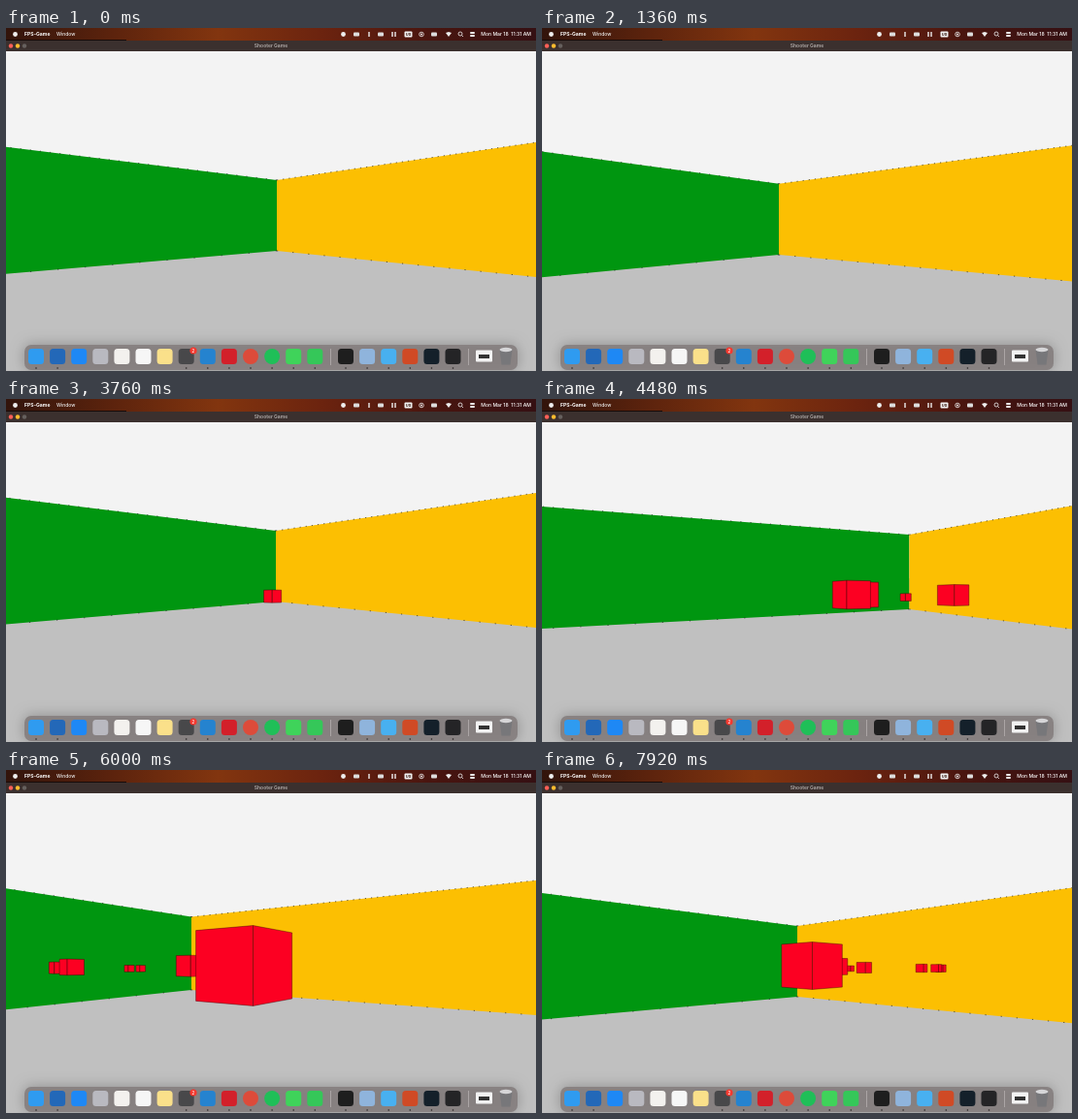
An HTML page with a canvas that plays this animation: 546x354 px, repeating every 8 s.

```html
<!DOCTYPE html>
<html lang="en">
<head>
<meta charset="utf-8">
<title>Shooter Game</title>
<style>
html, body { margin: 0; width: 100%; height: 100%; overflow: hidden; background: #c0c0c0; }
canvas { display: block; }
</style>
</head>
<body>
<canvas id="stage" width="546" height="354"></canvas>
<script>
const c = document.getElementById('stage').getContext('2d');
const W = 546, H = 354, MID = 273, FOCAL = 322, LOOP = 8000, STEP = 80;
const WALL = 73;              // wall height on screen when facing the corner
const EYE = 0.59;             // part of the wall above the horizon
const SPEED = 0.027;          // cube edges per ms
const LIFE = 2500;

// The player's view: time, x of the room corner, y of the horizon
const PATH = [
  [0, 279, 200], [1360, 244, 204], [2720, 345.5, 178], [2840, 275, 178],
  [3760, 278, 179], [3850, 234, 181], [4020, 326, 183], [4780, 390, 187],
  [5200, 374, 191], [5420, 272, 193], [6000, 191, 196], [6150, 123, 198],
  [6800, 203, 201], [7920, 263, 204]
];
const SHOTS = [2830, 3850, 4000, 4050, 4780, 5125, 5415, 5830, 6150, 6260, 6390, 6810, 7200, 7650];

// Smooth curve through PATH that comes to rest where it turns back
function follow(t, col) {
  let i = 0;
  while (i < PATH.length - 2 && t >= PATH[i + 1][0]) i++;
  const slope = j => PATH[j] && PATH[j + 1]
    ? (PATH[j + 1][col] - PATH[j][col]) / (PATH[j + 1][0] - PATH[j][0]) : 0;
  const tangent = j => {
    const a = slope(j - 1), b = slope(j);
    return a * b > 0 ? 2 * a * b / (a + b) : 0;
  };
  const a = PATH[i], b = PATH[i + 1], span = b[0] - a[0];
  const p = Math.min(1, (t - a[0]) / span), q = 1 - p;
  return a[col] * q * q * (1 + 2 * p) + b[col] * p * p * (3 - 2 * p)
    + span * p * q * (tangent(i) * q - tangent(i + 1) * p);
}

const yaw = t => Math.atan((follow(t, 1) - MID) / FOCAL);

function rect(x, y, w, h, fill, r = 0) {
  c.fillStyle = fill;
  c.beginPath();
  c.roundRect(x, y, w, h, r);
  c.fill();
}

function dot(x, y, r, fill) {
  c.fillStyle = fill;
  c.beginPath();
  c.arc(x, y, r, 0, 7);
  c.fill();
}

function poly(points, fill) {
  c.beginPath();
  points.forEach(p => c.lineTo(...p));
  c.closePath();
  c.fillStyle = fill;
  c.fill();
}

function text(s, x, y, size, fill, align = 'left', weight = 500) {
  c.font = `${weight} ${size}px Inter, sans-serif`;
  c.textAlign = align;
  c.textBaseline = 'middle';
  c.fillStyle = fill;
  c.fillText(s, x, y);
}

function edge(from, to, gap) {
  c.setLineDash([1.2, gap]);
  c.strokeStyle = '#222';
  c.lineWidth = 0.7;
  c.beginPath();
  c.moveTo(...from);
  c.lineTo(...to);
  c.stroke();
  c.setLineDash([]);
}

function room(t, turn) {
  const x = follow(t, 1), horizon = follow(t, 2), corner = WALL / Math.cos(yaw(t));
  rect(0, 0, W, horizon, '#f3f3f3');
  rect(0, horizon, W, H - horizon, '#c0c0c0');
  const wall = (end, slope, fill, gap) => {
    const depth = px => 1 + (px - MID) / FOCAL * slope;
    const side = px => {
      const h = corner * depth(px) / depth(x);
      return [[px, horizon - h * EYE], [px, horizon + h * (1 - EYE)]];
    };
    const [a, b] = side(x), [d, e] = side(end);
    poly([a, d, e, b], fill);
    edge(a, d, gap);
    edge(b, e, gap * 3);
  };
  wall(0, -Math.tan(turn), '#009610', 9);
  wall(W, 1 / Math.tan(turn), '#fcbf02', 5);
}

function cube(angle, dist, turn) {
  const cos = Math.cos(turn), sin = Math.sin(turn);
  const nx = dist * Math.sin(angle) - (cos - sin) / 2;
  const nz = dist * Math.cos(angle) - (cos + sin) / 2;
  const y = 206 - Math.min(4, 60 / dist);
  const side = (px, pz) => {
    const s = FOCAL / pz;
    return [[MID + px * s, y - s / 2], [MID + px * s, y + s / 2]];
  };
  const near = side(nx, nz);
  c.strokeStyle = 'rgba(40,0,0,.65)';
  c.lineWidth = 0.6;
  c.lineJoin = 'round';
  for (const far of [side(nx - sin, nz + cos), side(nx + cos, nz + sin)]) {
    poly([near[0], far[0], far[1], near[1]], '#fc0022');
    c.stroke();
  }
}

function cubes(t, turn) {
  for (const start of SHOTS) {
    const age = t - start;
    if (age * SPEED > 1.2 && age < LIFE) cube(yaw(t) - yaw(start), age * SPEED, turn);
  }
}

function menuBar() {
  const g = c.createLinearGradient(0, 0, W, 0);
  ['#32140b', '#5c230d', '#82350f', '#6b230f', '#49150f', '#351013']
    .forEach((s, i) => g.addColorStop(i / 5, s));
  rect(0, 0, W, 13, g);
  rect(0, 12, 124, 1, '#170b09');
  rect(0, 13, W, 11, '#3b302e');
  ['#fe5f57', '#febc2e', '#66605e'].forEach((f, i) => dot(5 + 7 * i, 18.5, 2.2, f));
  text('Shooter Game', MID, 18.4, 5, '#b4aeac', 'center', 600);

  dot(9.5, 6.5, 2.4, '#eee');
  text('FPS-Game', 19, 6.6, 5.1, '#fff', 'left', 700);
  text('Window', 52, 6.6, 5, '#eee');
  text('Mon Mar 18  11:31 AM', 541, 6.6, 5.1, '#fff', 'right');

  // status icons
  dot(347.5, 6.5, 2.4, '#eee');
  for (const x of [361, 386, 441]) rect(x - 3, 4.5, 6, 4, '#ddd', 1);
  for (const x of [374, 398, 401]) rect(x - 0.7, 4, 1.4, 5, '#eee');
  rect(410.5, 3.5, 8, 6, '#f2f2f2', 1);
  text('US', 414.5, 6.7, 4, '#33130c', 'center', 700);
  c.strokeStyle = '#eee';
  c.lineWidth = 0.8;
  c.beginPath();
  c.arc(428, 6.5, 2.3, 0, 7);
  c.moveTo(470, 6);
  c.arc(468, 6, 2, 0, 7);
  c.moveTo(469.5, 7.5);
  c.lineTo(471, 9);
  c.stroke();
  dot(428, 6.5, 1, '#eee');
  poly([[453, 5], [456, 4], [459, 5], [456, 9]], '#eee');
  for (const y of [4, 7]) rect(478, y, 5, 2, '#eee', 1);
}

const APPS = ['#2f9bf0', '#2368b8', '#1e88f5', '#b9b9c0', '#f3f1ee', '#f6f6f6', '#fae08a',
  '#48484a', '#2583cf', '#d3202a', '#dd4b3a', '#1fbf58', '#3fd35a', '#35c759',
  '#1e1e1e', '#8fb4dc', '#48b0f0', '#d04a25', '#14202a', '#242426'];

function dock() {
  c.shadowColor = 'rgba(0,0,0,.3)';
  c.shadowBlur = 14;
  rect(19, 327, 508, 26, 'rgba(134,127,127,.9)', 7);
  c.shadowBlur = 0;
  APPS.forEach((fill, i) => {
    const x = 31 + 22.1 * i + (i > 13 ? 9.6 : 0);
    if (i === 10 || i === 11) dot(x, 339, 8, fill);
    else rect(x - 8, 331, 16, 16, fill, 3.5);
    if (i < 2 || i > 6) dot(x, 351, 0.8, '#262323');
  });
  dot(193, 333, 3.6, '#f5392f');
  text('2', 193, 333.2, 4.5, '#fff', 'center');
  for (const x of [334, 476]) rect(x, 331, 0.8, 17, '#b5afaf');
  rect(484, 332.5, 17, 12, '#f2f2f2', 1);
  rect(487, 337, 11, 4, '#333');
  poly([[508.5, 332], [521.5, 332], [519.5, 347.5], [510.5, 347.5]], '#77777a');
  c.fillStyle = '#d6d6d8';
  c.beginPath();
  c.ellipse(515, 332, 6.5, 2.2, 0, 0, 7);
  c.fill();
}

function frame(now) {
  const t = Math.floor(now % LOOP / STEP) * STEP;
  const turn = Math.PI / 4 - 0.035 - yaw(t);
  room(t, turn);
  cubes(t, turn);
  menuBar();
  dock();
  requestAnimationFrame(frame);
}
requestAnimationFrame(frame);
</script>
</body>
</html>
```
